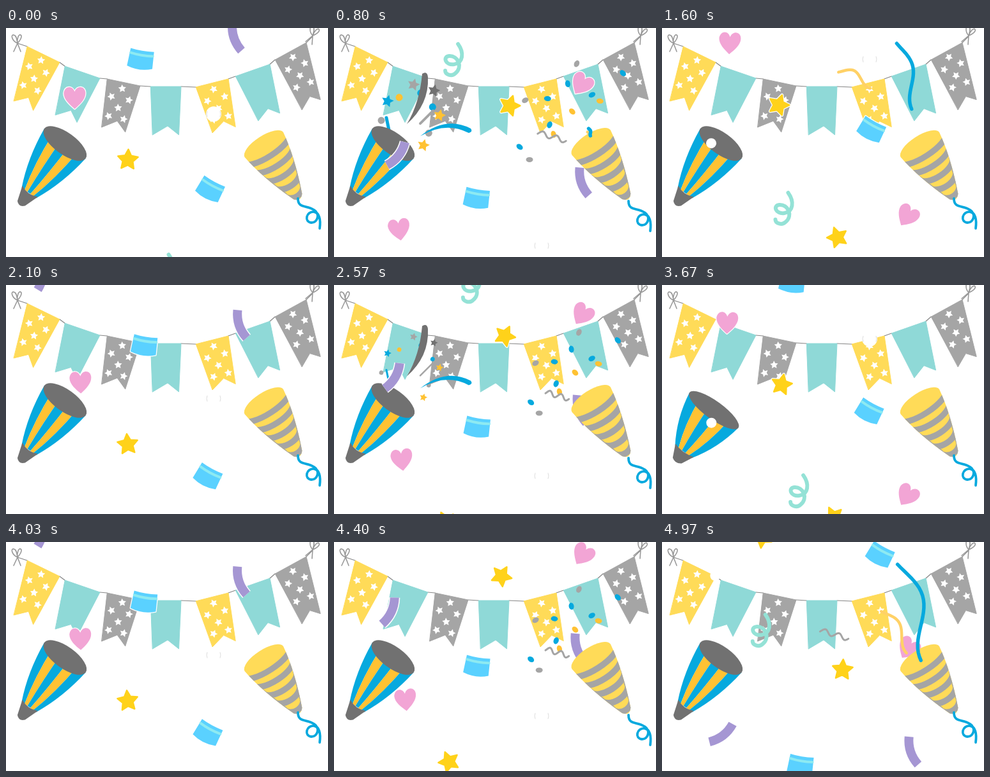
Write an HTML page with a canvas that moves like this. It is 504 px wide and 360 px high and loops after 5 s.

```html
<!DOCTYPE html>
<html lang="en">
<head>
<meta charset="utf-8">
<title>Party bunting</title>
<style>
html, body { margin: 0; width: 100%; height: 100%; overflow: hidden; background: #fff; }
canvas { display: block; }
</style>
</head>
<body>
<canvas id="stage" width="504" height="360"></canvas>
<script>
const c = document.getElementById('stage').getContext('2d');
const YELLOW = '#ffdb58', TEAL = '#8fd9d7', GREY = '#a5a5a5', DARK = '#717171',
      BLUE = '#06a9de', GOLD = '#ffc233', STAR = '#ffd21a', PINK = '#f2a5d5',
      PURPLE = '#a596d3', SKY = '#5ad1ff', MINT = '#94e2d6';
const LOOP = 5000, SPEED = 0.2587, FALL = 500, BURST = 1830;
const { PI, sin, cos, hypot, abs, max, min } = Math;

const clamp = v => max(0, min(1, v));
const mod = (a, n) => ((a % n) + n) % n;
const rad = deg => deg * PI / 180;
const mix = (a, b, k) => a.map((v, i) => v + (b[i] - v) * k);

function placed(x, y, deg, draw) {
  c.save();
  c.translate(x, y);
  c.rotate(rad(deg));
  draw();
  c.restore();
}

function trace(points) {
  c.beginPath();
  points.forEach(([x, y]) => c.lineTo(x, y));
}

function poly(points, color) {
  trace(points);
  c.closePath();
  c.fillStyle = color;
  c.fill();
}

function oval(x, y, rx, ry, color) {
  c.beginPath();
  c.ellipse(x, y, rx, ry, 0, 0, 7);
  c.fillStyle = color;
  c.fill();
}

function fill(path, color) {
  c.fillStyle = color;
  c.fill(new Path2D(path));
}

function line(path, color, width) {
  c.strokeStyle = color;
  c.lineWidth = width;
  c.stroke(new Path2D(path));
}

function outlined(path, color) {
  line(path, '#fff', 2.5);
  fill(path, color);
}

function star(r, color, edge) {
  poly(Array.from({ length: 10 }, (_, i) => {
    const a = i * PI / 5 - PI / 2, d = i % 2 ? r * 0.5 : r;
    return [d * cos(a), d * sin(a)];
  }), color);
  if (!edge) return;
  for (const [ink, width] of [['#fff', 5], [color, 2.5]]) {
    c.strokeStyle = ink;
    c.lineWidth = width;
    c.stroke();
  }
  c.fill();
}

// A sine ribbon swinging around the chord from (x1, y1) to (x2, y2).
function wave([x1, y1, x2, y2, swing], turn, color, width) {
  const dx = x2 - x1, dy = y2 - y1, len = hypot(dx, dy) || 1;
  trace(Array.from({ length: 25 }, (_, i) => {
    const p = i / 24, d = swing * sin(turn * p - 0.5) / len;
    return [x1 + dx * p + dy * d, y1 + dy * p - dx * d];
  }));
  c.strokeStyle = color;
  c.lineWidth = width;
  c.stroke();
}

// ---- bunting: each flag hangs from the two ends of its top edge ----
const flags = [
  [33, 29, 84, 54, YELLOW, true],
  [92, 60, 147, 79, TEAL],
  [158, 80, 210, 91, GREY, true],
  [226, 92, 274, 92, TEAL],
  [297, 93, 348, 80, YELLOW, true],
  [359, 76, 413, 57, TEAL],
  [421, 50, 470, 23, GREY, true]
];

function flag([x1, y1, x2, y2, color, starry]) {
  const slope = Math.atan2(y2 - y1, x2 - x1) * 180 / PI, steep = abs(slope);
  const lean = max(-21, min(21, slope));
  const long = 76 + 1.3 * max(0, steep - 18), half = 20.5 - 0.14 * steep;
  const x = (x1 + x2) / 2, y = (y1 + y2) / 2;
  const bx = x - long * sin(rad(lean)), by = y + long * cos(rad(lean));
  const ux = cos(rad(slope)), uy = sin(rad(slope));
  poly([[x1, y1], [x2, y2], [bx + half * ux, by + half * uy],
        [bx + 14 * sin(rad(lean)) + 3 * cos(rad(lean)), by - 14 * cos(rad(lean))],
        [bx - half * ux, by - half * uy]], color);
  c.strokeStyle = color;
  c.lineWidth = 1;
  c.stroke();
  if (starry) placed(x, y, lean, () => {
    for (let row = 0; row < 4; row++)
      for (const side of row % 2 ? [-1, 1] : [0])
        placed(side * (15 - row), 10 + 15.5 * row, 20 * side - 15, () => star(6.5, '#fff'));
  });
}

function bow(x, y, deg) {
  placed(x, y, deg, () =>
    line('M0 0C-9 -4 -11 -14 -6 -13S-1 -5 0 0C-1 -8 2 -15 5 -13S4 -4 0 0L-6 13M0 0L5 13', '#999', 1.6));
}

function bunting() {
  let rope = 'M18 24';
  for (const [x1, y1, x2, y2] of flags) rope += `L${x1} ${y1}M${x2} ${y2}`;
  line(rope + 'L480 13', '#858585', 1.2);
  bow(18, 24, 0);
  bow(480, 12, 25);
  flags.forEach(flag);
}

// ---- poppers, drawn upright from their tips ----
function leftPopper(wide, tall) {
  placed(23, 277, 36, () => {
    c.scale(wide, tall);
    for (let i = 0; i < 5; i++) {
      const a = i / 2.5 - 1, b = a + 0.4;
      fill(`M${40 * a} -118Q${34 * a} -65 ${14 * a} -22H${14 * b}Q${34 * b} -65 ${40 * b} -118Z`,
        i % 2 ? GOLD : BLUE);
    }
    fill('M-15 -25Q0 -18 15 -25L7 -2Q0 6 -7 -1Z', DARK);
    oval(0, -118, 40, 17, DARK);
  });
}

function rightPopper(pop) {
  placed(460 + pop, 270, -33, () => {
    c.scale(1, 1 + 0.04 * pop);
    c.clip(new Path2D('M-36 -103A36 14 0 0 1 36 -103Q30 -60 8 -6Q0 4 -8 -6Q-30 -60 -36 -103Z'));
    c.fillStyle = YELLOW;
    c.fillRect(-40, -120, 80, 125);
    c.strokeStyle = GREY;
    c.lineWidth = 9.5;
    for (let y = -97; y < 0; y += 19) {
      c.beginPath();
      c.ellipse(0, y, 10 - y * 0.35, 14, 0, 0, PI);
      c.stroke();
    }
  });
  placed(4 * pop, 4 * pop, 0, () =>
    line('M457 268C457 284 470 278 482 286C492 292 488 306 478 306C466 305 470 288 482 289C490 290 493 300 491 315', BLUE, 3.8));
}

// ---- falling pieces ----
const heart = () => outlined('M0 18C-8 11 -17 3 -17 -7C-15 -19 -3 -19 0 -9C4 -20 17 -18 17 -7C17 3 8 11 0 18Z', PINK);
const bigStar = () => star(16.5, STAR, true);
const curl = () => line('M6 -26C16 -12 14 4 0 6C-14 8 -18 -6 -8 -7C6 -8 14 10 2 20C-4 26 -14 22 -14 16', MINT, 6);
function card() {
  outlined('M-18 -16Q0 -13 19 -15L20 12Q0 19 -20 12Z', SKY);
  line('M-17 -9Q0 -6 18 -8', '#8deaf2', 4);
}
const strip = side => () => {
  const path = `M${-3 * side} -23Q${7 * side} 0 ${-3 * side} 23`;
  c.lineCap = 'butt';
  line(path, '#fff', 17);
  line(path, PURPLE, 14);
};
const ball = (r, rim) => () => {
  oval(0, 0, r, r, '#fff');
  c.strokeStyle = rim;
  c.lineWidth = 1;
  for (const a of [0, PI]) {
    c.beginPath();
    c.arc(0, 0, r - 1, a - 0.4, a + 0.4);
    c.stroke();
  }
};

// Each piece passes the top edge at `off`, sways as sin(y / bend) and turns as it falls.
const spinStar = { draw: bigStar, sway: 33, tilt: 40, spin: -0.18 };
const behind = [
  { draw: strip(-1), x: 356, sway: 35, bend: 200, off: 402, rate: 1.1, tilt: -18 },
  { draw: heart, x: 390, sway: -6, bend: 200, off: 34, tilt: 33 }
];
const front = [
  { draw: ball(12, '#ddd'), x: 325, off: 280 },
  { draw: ball(8, '#fff'), x: 88, sway: -11, bend: 120, off: 148 },
  { draw: heart, x: 111, sway: -9, bend: 40, off: 306, tilt: 4, spin: -0.04 },
  { draw: card, x: 204, sway: 20, off: 368, rate: 1.055, tilt: 8 },
  { draw: card, x: 343, sway: -40, bend: 400, off: 182, rate: 1.09, tilt: 27 },
  { draw: curl, x: 218, sway: -64, bend: 105, off: 577, rate: 1.13 },
  { draw: strip(1), x: 60, sway: 40, off: 470, rate: 1.31, tilt: 10, spin: 0.14 },
  { ...spinStar, x: 158, off: 208 },
  { ...spinStar, x: 250, off: 0 }
];

function drop({ draw, x, off, sway = 0, bend = 143, rate = 1, tilt = 0, spin = 0 }, fallen) {
  const y = (mod(fallen - off + 45, FALL) - 45) * rate;
  placed(x + sway * sin(y / bend), y, tilt + spin * y, draw);
}

// ---- left burst: a fan of dots and stars, densest in the middle ----
const fan = [GREY, BLUE, GOLD, GREY, BLUE, DARK, BLUE, GOLD, GREY, GOLD];

function leftBurst(u) {
  if (u > 115) return;
  const k = 1 - (1 - clamp(u / 17)) ** 2;
  const size = k * min(0.35 + u / 90, 1, (115 - u) / 40);
  placed(93, 181 + (u - 66) * 0.18, 0, () => {
    c.scale(k, k);
    fan.forEach((color, i) => {
      const p = i / 4.5 - 1, a = rad(303 + 40 * p + 21 * p ** 3);
      const far = (47 + 58 * sin(PI * i / 9)) * (i % 2 ? 1 : 0.86);
      placed(far * cos(a), far * sin(a), 15, () =>
        i % 2 ? star(10 * size, color) : oval(0, 0, 5.5 * size, 5.5 * size, color));
    });
    line('M-11 -40L-5 -11', BLUE, 5 * size);
    line('M42 -31L62 -51', GREY, 4 * size);
    c.globalAlpha = clamp(size * 2);
    fill('M45 -109Q53 -114 54 -104Q56 -61 21 -30Q41 -63 45 -109Z', DARK);
    fill('M42 -11Q82 -43 121 -23Q125 -18 118 -16Q82 -35 42 -11Z', BLUE);
  });
}

// ---- right burst: dots in a fan, then streamers that rise and shrink away ----
const nozzle = [401, 168, 401, 168, 0];

function streamer(r, high, late, color, width) {
  const pose = r < 750 ? mix(nozzle, high, clamp((r - 200) / 550)) : mix(high, late, (r - 750) / 290);
  wave(pose, 5.5, color, width * clamp((1220 - r) / 160));
}

function rightBurst(r) {
  const k = (r / 240) ** 0.6, size = clamp((560 - r) / 200) * clamp(r / 60);
  if (size > 0) for (let i = 0; i < 12; i++) {
    const a = rad(160 + 12.4 * i), far = k * (85 + 35 * cos(1.75 * (i - 4.2)));
    placed(402 + far * cos(a), 172 + far * sin(a), i * 37, () =>
      oval(0, 0, 5.5 * size, 4 * size, [GREY, BLUE, GOLD, BLUE][i % 4]));
  }
  if (r < 900) {
    const x = 375 - 0.14 * r, y = 182 - 0.05 * r, half = 22 * clamp(r / 220);
    wave([x - half, y - half / 4, x + half, y + half / 3, 4], 13, GREY, 3 * clamp((900 - r) / 150));
  }
  if (r > 200 && r < 1220) {
    streamer(r, [347, 107, 390, 170, 9], [278, 66, 329, 88, 8], '#ffd166', 4.5);
    streamer(r, [376, 33, 420, 182, 16], [372, 23, 400, 125, 10], BLUE, 5.5);
  }
}

function frame(now) {
  const t = mod(now - start, LOOP);
  const fallen = 415 + SPEED * t, u = mod(fallen, FALL), r = mod(t - 560, BURST);
  c.fillStyle = '#fff';
  c.fillRect(0, 0, 504, 360);
  c.lineCap = c.lineJoin = 'round';
  bunting();
  behind.forEach(piece => drop(piece, fallen));
  const squash = clamp((u - 332) / 14) * clamp((405 - u) / 25);
  leftBurst(mod(fallen - 56, FALL));
  leftPopper(1 + 0.18 * squash, 1 - 0.16 * squash);
  rightPopper(clamp(r / 80) * clamp((500 - r) / 150));
  rightBurst(r);
  front.forEach(piece => drop(piece, fallen));
  requestAnimationFrame(frame);
}
const start = performance.now();
frame(start);
</script>
</body>
</html>
```
